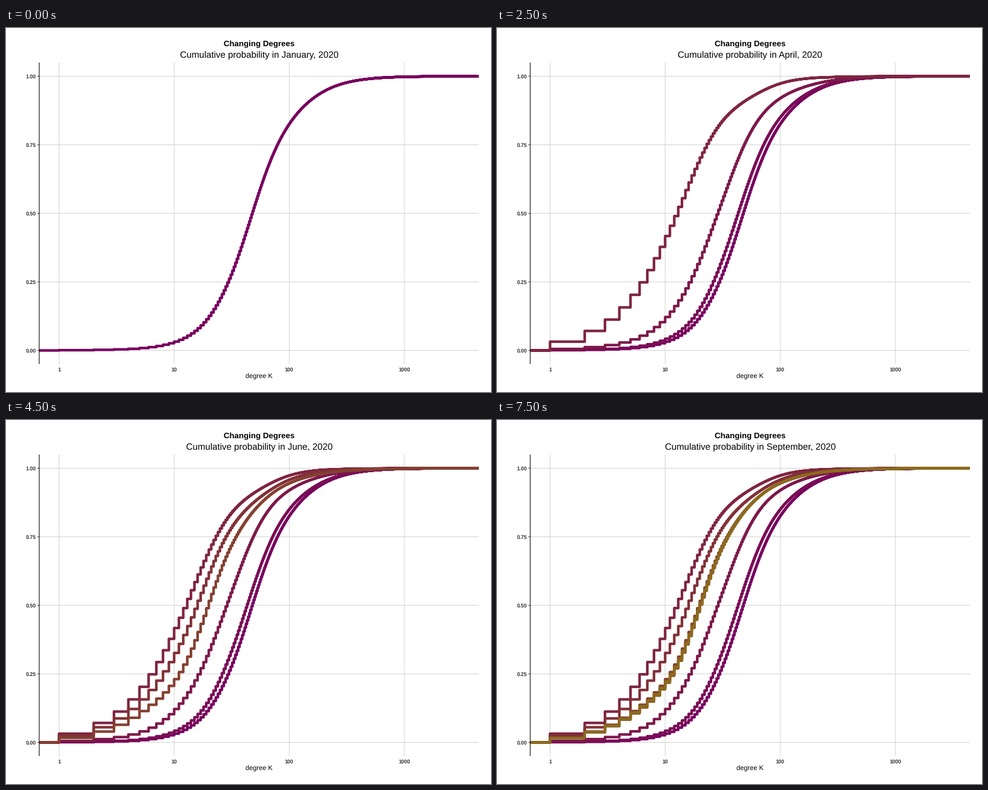
A matplotlib script for the animation above (8000 ms loop, 800 by 600 pixels).

```python
import matplotlib.pyplot as plt
import numpy as np
from matplotlib.animation import FuncAnimation
from matplotlib.colors import LinearSegmentedColormap
from matplotlib.patches import Rectangle

W, H, DPI = 800, 600, 100
LEFT, RIGHT, TOP, BOTTOM = 54.8, 780, 57, 554
X_ONE, DECADE = 87.5, 189.85
Y_ZERO, Y_SPAN = 531.5, 452
MAX_DEGREE = 4300

MONTHS = ["January", "February", "March", "April", "May",
          "June", "July", "August", "September"]
RAMP = LinearSegmentedColormap.from_list("ramp", ["#78005f", "#813137", "#8b6a1e"])

# Key points: cumulative probability in per mille at six degrees
KEYS = np.log([1, 4, 12, 30, 70, 200, MAX_DEGREE])
JAN = [1, 6, 46, 262, 703, 945]
FEB = [1.5, 9, 60, 316, 743, 952]
MAR = [5.5, 29, 162, 530, 862, 972]
APR = [32, 157, 490, 829, 947, 994]
MAY = [25, 122, 392, 773, 924, 988]
JUN = [17, 90, 284, 705, 907, 981]
AUG = [16, 83, 270, 697, 907, 982]


def mix(a, b, t):
    return [p + (q - p) * t for p, q in zip(a, b)]


CURVES = [JAN, FEB, MAR, APR, MAY, JUN, mix(JUN, AUG, 0.4), AUG, mix(AUG, JUN, 0.3)]


def px(size):
    """Pixels to points."""
    return size * 72 / DPI


def x_of(k):
    return X_ONE + DECADE * np.log10(k)


def y_of(p):
    return Y_ZERO - Y_SPAN * p


def hermite(x, xs, ys):
    """Smooth curve through the key points."""
    slope = np.gradient(ys, xs)
    i = np.clip(np.searchsorted(xs, x) - 1, 0, len(xs) - 2)
    h = xs[i + 1] - xs[i]
    t = (x - xs[i]) / h
    return ((1 + 2 * t) * (1 - t) ** 2 * ys[i] + t * (1 - t) ** 2 * h * slope[i]
            + t * t * (3 - 2 * t) * ys[i + 1] + t * t * (t - 1) * h * slope[i + 1])


def step_path(curve):
    """Staircase over whole degrees, smooth on logit and log scales."""
    p = np.array(curve + [999.9]) / 1000
    k = np.arange(1, MAX_DEGREE + 1)
    logit = hermite(np.log(k), KEYS, np.log(p / (1 - p)))
    levels = np.concatenate([[0], 1 / (1 + np.exp(-logit))])
    x = np.concatenate([[LEFT - 5], np.repeat(x_of(k), 2), [RIGHT + 5]])
    return x, y_of(np.repeat(levels, 2))


plt.rcParams["font.family"] = "Liberation Sans"
plt.rcParams["text.hinting"] = "none"
plt.rcParams["path.simplify"] = False

fig = plt.figure(figsize=(W / DPI, H / DPI), dpi=DPI, facecolor="white")
ax = fig.add_axes([0, 0, 1, 1])
ax.set_xlim(0, W)
ax.set_ylim(H, 0)
ax.axis("off")


def rule(xs, ys, color, z):
    ax.plot(xs, ys, color=color, lw=px(1.07), solid_capstyle="butt",
            snap=False, zorder=z)


def label(x, y, text, size, color="black", ha="center", weight="normal"):
    return ax.text(x, y, text, fontsize=px(size), color=color, ha=ha,
                   va="baseline", weight=weight, zorder=5)


for k in (1, 10, 100, 1000):
    rule([x_of(k)] * 2, [TOP, BOTTOM], "#d6d6d6", 1)
    label(x_of(k), 566, str(k), 8.8, "#383838", weight="bold")
for p in (0, 0.25, 0.5, 0.75, 1):
    y = y_of(p)
    rule([LEFT, RIGHT], [y, y], "#d6d6d6", 1)
    rule([52, LEFT], [y, y], "#333333", 4)
    label(50, y + 3.2, f"{p:.2f}", 8.8, "#383838", ha="right", weight="bold")
rule([LEFT, LEFT], [TOP, BOTTOM], "black", 4)

label(417.5, 30, "Changing Degrees", 13.2, weight="bold")
subtitle = label(417.5, 49, "", 15)
label(417.5, 578, "degree K", 11)

panel = Rectangle((LEFT, TOP), RIGHT - LEFT, BOTTOM - TOP, transform=ax.transData)
lines = []
for i, curve in enumerate(CURVES):
    line, = ax.plot(*step_path(curve), color=RAMP(i / (len(CURVES) - 1)),
                    lw=px(4.27), zorder=2 + i / 10,
                    solid_joinstyle="round", solid_capstyle="butt")
    line.set_clip_path(panel)
    lines.append(line)


def update(frame):
    month = (frame + 1) // 2
    subtitle.set_text(f"Cumulative probability in {MONTHS[month]}, 2020")
    for i, line in enumerate(lines):
        line.set_visible(i <= month)
    return [subtitle, *lines]


anim = FuncAnimation(fig, update, frames=16, interval=500, repeat=True,
                     repeat_delay=0, blit=False)
plt.show()
```
